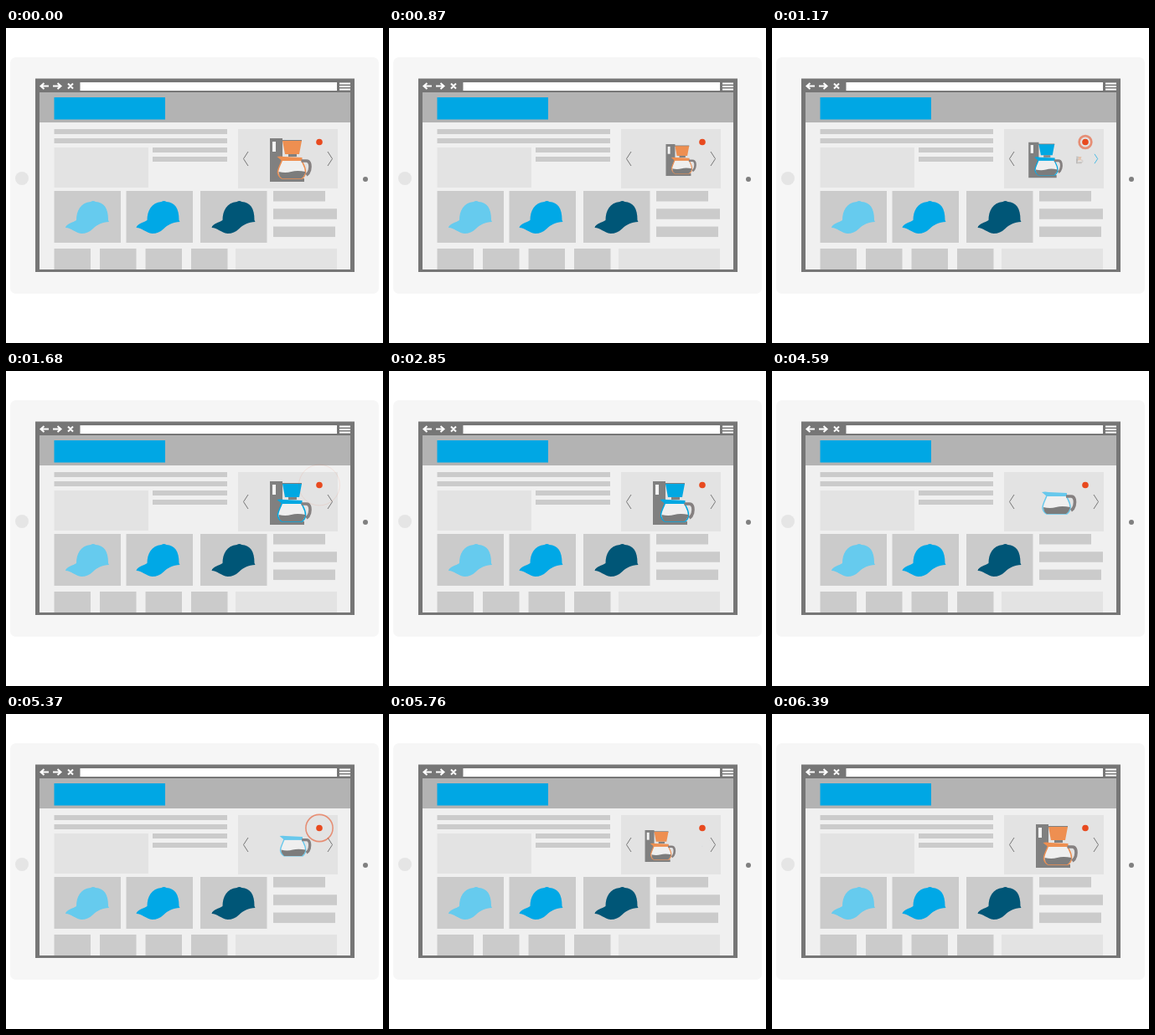
An HTML page that plays this animation: 450 by 377 pixels, repeating every 6420 ms.

```html
<!DOCTYPE html>
<html lang="en">
<head>
<meta charset="utf-8">
<title>Tablet shop carousel</title>
<style>
html, body { margin: 0; width: 100%; height: 100%; overflow: hidden; background: #fff; }
svg { display: block; width: 450px; height: 377px; }
</style>
</head>
<body>
<svg viewBox="0 0 450 377" fill="none">
  <defs>
    <path id="cap" d="M71 239C72 234 80 233 84 230C84 219 89 209 101 208Q104 206 107 208C117 209 122 215 122 230L123 232C115 232 108 236 104 240Q98 246 90 246C82 245 78 239 71 239Z"/>
    <g id="pot">
      <path d="M328 149C326 155 323 159 323 164Q324 169 328 171H352Q356 168 356 163C356 157 353 154 351 149Z" fill="#efefef" stroke="currentColor" stroke-width="1.5"/>
      <path d="M324 163Q332 165 339 163T356 163Q355 168 351 171H328Q324 168 324 163Z" fill="#7c7c7c"/>
      <path d="M322 145Q326 144 330 145L352 146V150H328Z" fill="currentColor"/>
      <path d="M351 150H357C362 150 362 157 361 161Q360 165 357 167" stroke="#858080" stroke-width="3.6"/>
    </g>
    <g id="machine">
      <path d="M315 132H330V134H353V136H330V180H356V184H315Z" fill="#808080"/>
      <path d="M318 136H322V148H318Z" fill="#f4f4f4"/>
      <path d="M330 135H353L350 151H333Z" fill="currentColor"/>
      <path d="M337 151H347V154H337Z" fill="#808080"/>
      <use href="#pot" x="1.5" y="9"/>
    </g>
  </defs>
  <rect x="5" y="35" width="440" height="283" rx="7" fill="#f6f6f6"/>
  <circle cx="19" cy="180" r="8" fill="#e5e5e5"/>
  <circle cx="429" cy="181" r="3" fill="#808080"/>
  <g id="page"></g>
  <g stroke="#fff" stroke-width="2">
    <path id="back" d="M51 69.5H42M45.5 66L41.5 69.5L45.5 73"/>
    <use href="#back" transform="matrix(-1 0 0 1 107 0)"/>
    <path d="M74 66.5L80 72.5M80 66.5L74 72.5M398 66.5H411M398 70H411M398 73.5H411"/>
  </g>
  <g id="caps"></g>
  <path d="M289 148L283.500 156.500L289 165" stroke="#777"/>
  <path id="next" d="M-3 -8.500L2.500 0L-3 8.500"/>
  <use class="item" href="#machine" color="#ee8f51"/>
  <use class="item" href="#machine" color="#00a8e2"/>
  <use class="item" href="#pot" color="#67c8ec"/>
  <circle id="ring" cx="374" cy="136.500" stroke="#e8552b"/>
  <circle cx="374" cy="136.500" r="3.800" fill="#e84a1f"/>
</svg>
<script>
const LOOP = 6420;
const $ = id => document.getElementById(id);
const clamp = x => Math.min(1, Math.max(0, x));
const easeOut = u => 1 - (1 - u) ** 2;

function box(x, y, w, h, fill = '#cbcbcb') {
  $('page').innerHTML += `<rect x="${x}" y="${y}" width="${w}" height="${h}" fill="${fill}"/>`;
}

function buildPage() {
  const pale = '#e3e3e3';
  box(35, 60.5, 381, 231.5, '#767676');
  box(40, 77, 371, 212, '#f0f0f0');
  box(40, 77, 371, 36, '#b3b3b3');
  box(88.5, 65, 306.5, 10, '#fff');
  box(57.5, 83, 132.5, 26.5, '#00a7e4');
  for (let i = 0; i < 4; i++) {
    const left = i < 2 ? 57.5 : 175;
    box(left, 121 + 11 * i, 264 - left, 6);
    box(57.5 + 54.5 * i, 264, 43.5, 25);
  }
  box(57.5, 143, 112.5, 48, pale);
  box(277, 121, 119, 71, pale);
  box(274, 264, 121, 25, pale);
  [62, 76, 74].forEach((w, i) => box(319, 195 + 21.3 * i, w, 12.5));
  [57.5, 143.5, 232].forEach(x => box(x, 195, 79.5, 62));
  const caps = [[0, '#66cbee'], [84.5, '#00a8e6'], [174.5, '#005677']];
  $('caps').innerHTML = caps.map(([x, fill]) =>
    `<use href="#cap" x="${x}" fill="${fill}"/>`).join('');
}

const items = [...document.querySelectorAll('.item')];

// Each slide hands over from one item to the next
const slides = [
  { start: 680, click: 1120, out: 570 },
  { start: 3000, click: 3150, out: 470 },
  { start: 5310, click: 5155, out: 470 }
];

function place(i, dx, scale) {
  const x = i < 2 ? 339.5 : 342.5, y = 158;
  items[i].style.display = scale > 0.01 ? '' : 'none';
  items[i].setAttribute('opacity', clamp(2.5 * scale));
  items[i].setAttribute('transform',
    `translate(${x + dx} ${y}) scale(${scale}) translate(${-x} ${-y})`);
}

function drawItems(t) {
  items.forEach((_, i) => place(i, 0, i ? 0 : 1));
  slides.forEach(({ start, out }, i) => {
    if (t < start) return;
    const leave = clamp((t - start) / out) ** 1.2;
    const enter = easeOut(clamp((t - start - 270) / 640));
    place(i, 33 * leave, 1 - leave);
    place((i + 1) % 3, 31 * (enter - 1), easeOut(enter));
  });
}

function drawClick(t) {
  const ages = slides.map(s => t - s.click);

  // The arrow shrinks and lights up while pressed
  const hold = ages.map(a => (a + 60) / 230).find(u => u > 0 && u < 1) || 0;
  $('next').setAttribute('transform', `translate(387 156.5) scale(${1 - 0.33 * Math.sin(hold * Math.PI)})`);
  $('next').setAttribute('stroke', hold ? '#00a8e6' : '#777');

  const u = clamp((ages.find(a => a >= 0 && a < 600) ?? 600) / 600);
  $('ring').setAttribute('r', 4 + 20.5 * easeOut(u));
  $('ring').setAttribute('stroke-width', Math.max(1, 3 - 4 * u));
  $('ring').setAttribute('opacity', Math.min(0.6, 1.6 * (1 - u)));
}

buildPage();
const begin = performance.now();
function frame() {
  const t = (performance.now() - begin) % LOOP;
  drawItems(t);
  drawClick(t);
  requestAnimationFrame(frame);
}
frame();
</script>
</body>
</html>
```
